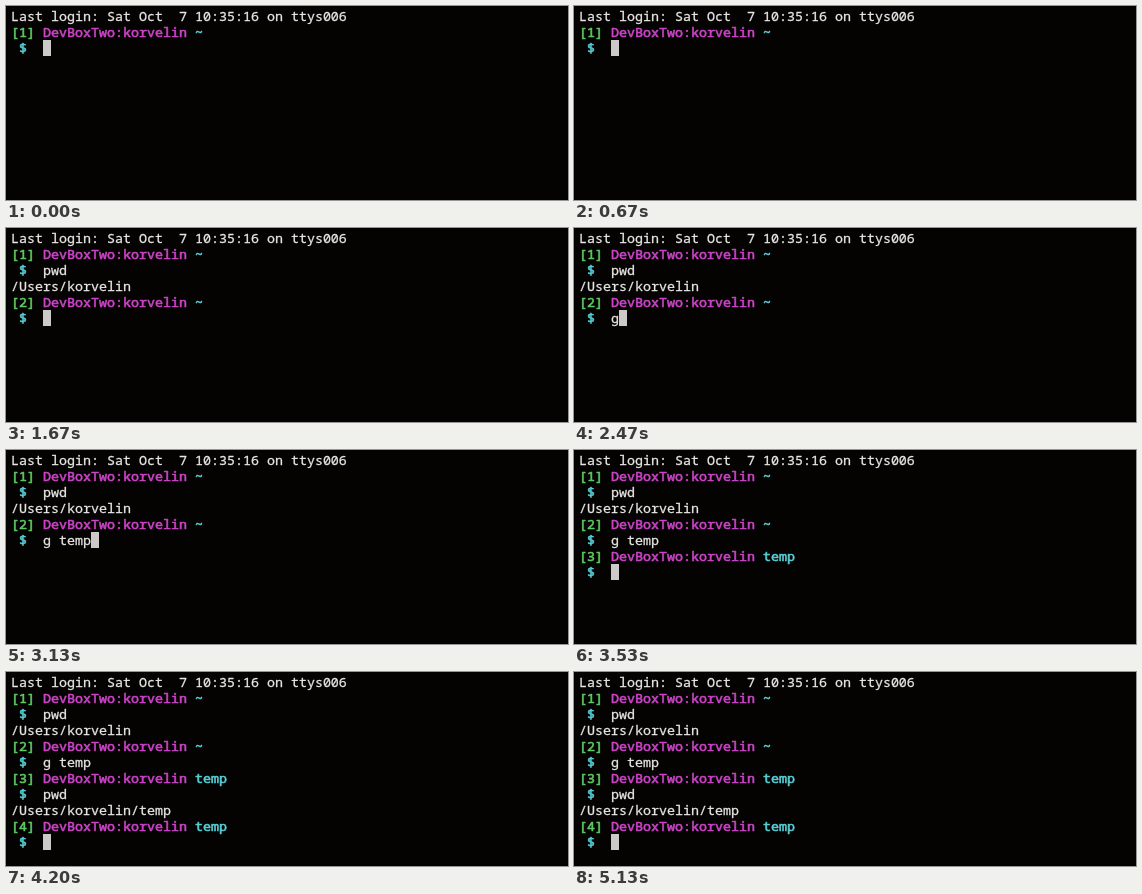
An HTML page with a canvas that plays this animation: 562x194 px, repeating every 5190 ms.

```html
<!DOCTYPE html>
<html lang="en">
<head>
<meta charset="utf-8">
<title>Terminal session</title>
<style>
  html, body { margin: 0; width: 100%; height: 100%; overflow: hidden; background: #040302; }
  canvas { display: block; }
</style>
</head>
<body>
<canvas id="stage" width="562" height="194"></canvas>
<script>
const ctx = document.getElementById('stage').getContext('2d');

const LOOP = 5190;
const CELL = 8, ROW = 16, LEFT = 5, TOP = 2, BASELINE = 13;
const REGULAR = 0.3, MEDIUM = 0.6;
const COLOR = {
  back: '#040302', text: '#e6e5e3', index: '#5fcb63',
  host: '#cc44c8', path: '#58d0d6', cursor: '#cbcac8'
};
const USER = 'korvelin';
const HOST = 'DevBoxTwo:' + USER;

// Each command lists its key times; output and the next prompt appear at `enter`.
const session = [
  { dir: '~', text: 'pwd', keys: [730, 870, 1000], enter: 1400, output: '/Users/' + USER },
  { dir: '~', text: 'g temp', keys: [2465, 2600, 2800, 2870, 3000, 3070], enter: 3200 },
  { dir: 'temp', text: 'pwd', keys: [3730, 3865, 4000], enter: 4195, output: '/Users/' + USER + '/temp' },
  { dir: 'temp', text: '', keys: [], enter: Infinity }
];

// A thin outline in the fill colour gives the terminal's heavier stems.
function put(text, col, row, color, outline = REGULAR) {
  const x = LEFT + col * CELL, y = TOP + row * ROW + BASELINE;
  ctx.font = '13.333px "Noto Sans Mono", monospace';
  ctx.lineJoin = 'round';
  ctx.lineWidth = outline;
  ctx.fillStyle = ctx.strokeStyle = color;
  ctx.fillText(text, x, y);
  ctx.strokeText(text, x, y);
}

function drawPrompt(number, dir, row) {
  put('[' + number + ']', 0, row, COLOR.index, MEDIUM);
  put(HOST, 4, row, COLOR.host, MEDIUM);
  put(dir, 5 + HOST.length, row, COLOR.path, MEDIUM);
  put('$', 1, row + 1, COLOR.path, MEDIUM);
}

function draw(time) {
  ctx.fillStyle = COLOR.back;
  ctx.fillRect(0, 0, 562, 194);
  put('Last login: Sat Oct  7 10:35:16 on ttys006', 0, 0, COLOR.text);

  let row = 1;
  for (const [i, command] of session.entries()) {
    drawPrompt(i + 1, command.dir, row++);
    const typed = command.keys.filter(key => key <= time).length;
    put(command.text.slice(0, typed), 4, row, COLOR.text);
    if (time < command.enter) {
      ctx.fillStyle = COLOR.cursor;
      ctx.fillRect(LEFT + (4 + typed) * CELL, TOP + row * ROW, CELL, ROW);
      return;
    }
    row++;
    if (command.output) put(command.output, 0, row++, COLOR.text);
  }
}

const start = performance.now();
function tick() {
  draw((performance.now() - start) % LOOP);
  requestAnimationFrame(tick);
}
tick();
</script>
</body>
</html>
```
